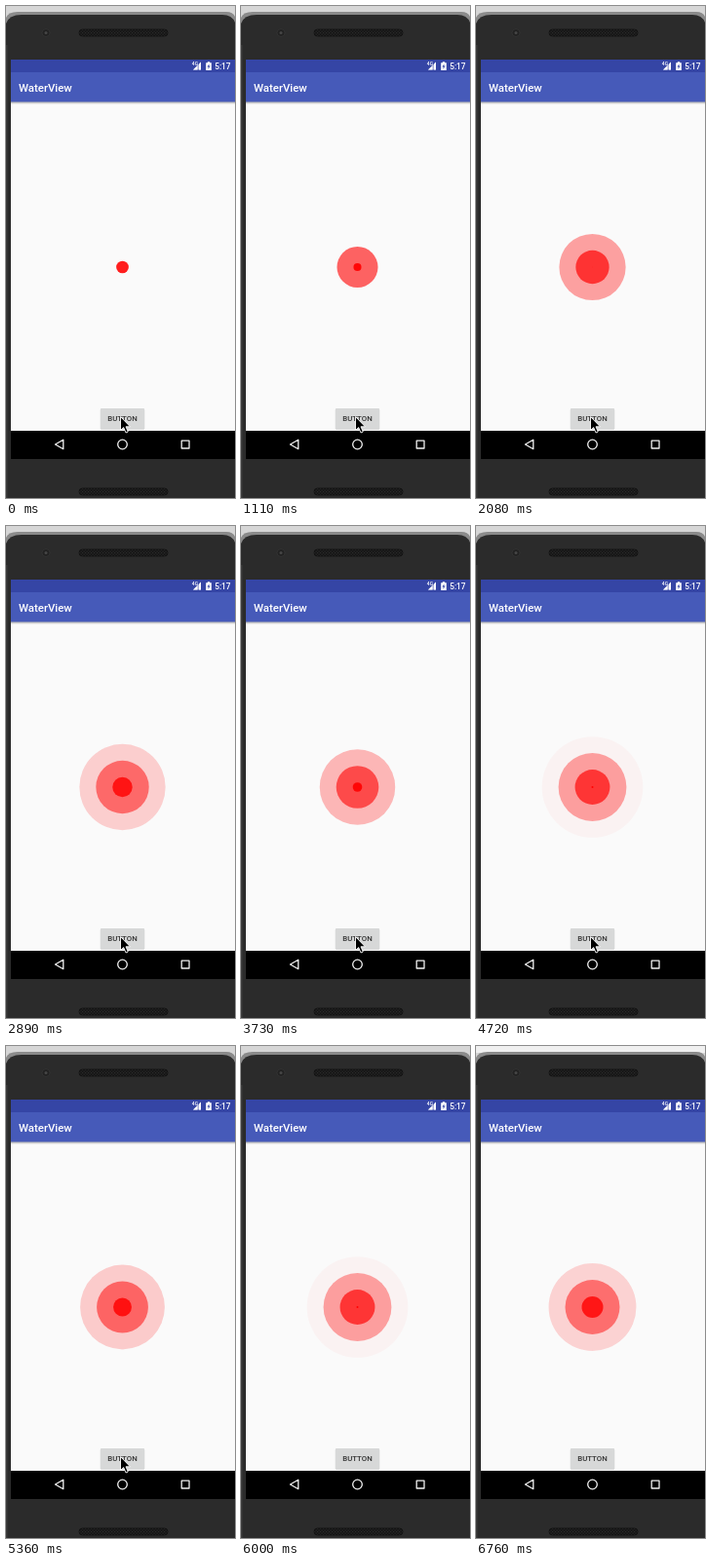
Animation, 235 px wide and 505 px high, one loop 6.86 s. Source, as an HTML page:

```html
<!DOCTYPE html>
<html lang="en">
<head>
<meta charset="utf-8">
<title>WaterView</title>
<style>
  html, body { margin: 0; width: 100%; height: 100%; overflow: hidden; background: #d6d6d6; }
  svg { display: block; width: 235px; height: 505px; }
  text { font-family: Roboto, "Open Sans", sans-serif; font-weight: 500; }
</style>
</head>
<body>
<svg viewBox="0 0 235 505" xmlns="http://www.w3.org/2000/svg">
  <defs>
    <pattern id="mesh" width="3" height="3" patternUnits="userSpaceOnUse">
      <rect width="3" height="3" fill="#141414"/>
      <rect width="1.2" height="1.2" fill="#2c2c2c"/>
      <rect x="1.5" y="1.5" width="1.2" height="1.2" fill="#2c2c2c"/>
    </pattern>
    <linearGradient id="shade" x2="0" y2="1">
      <stop stop-color="#000" stop-opacity=".3"/>
      <stop offset="1" stop-color="#000" stop-opacity="0"/>
    </linearGradient>
  </defs>

  <!-- phone body -->
  <rect id="strip" width="235" height="7" fill="#d6d6d6"/>
  <path d="M0 505V12Q2 6 12 6H226Q233 6 235 11V505Z" fill="#8a8a8a"/>
  <path d="M0 505V18Q3 9 16 9H222Q232 9 235 17V505Z" fill="#2b2b2b"/>
  <rect y="40" width="1.5" height="465" fill="#3a3a3a"/>
  <g fill="url(#mesh)" stroke="#111" stroke-width=".8">
    <rect x="75" y="24" width="91" height="7" rx="3.5"/>
    <rect x="75" y="495" width="91" height="7" rx="3.5"/>
  </g>
  <circle cx="41" cy="27.5" r="4" fill="#222" stroke="#383838" stroke-width=".7"/>
  <circle cx="41" cy="27.5" r="1.5" fill="#464646"/>

  <!-- screen -->
  <rect x="5" y="55" width="230" height="410" fill="#fafafa"/>
  <rect x="5" y="55" width="230" height="13" fill="#3545a5"/>
  <rect x="5" y="68" width="230" height="30.5" fill="#465ab9"/>
  <rect x="5" y="98.5" width="230" height="2.5" fill="url(#shade)"/>
  <text x="13" y="87.8" font-size="11.4" fill="#fff">WaterView</text>

  <!-- status icons -->
  <g fill="#fff">
    <path d="M200 57.5V65.5H192Z" fill-opacity=".55"/>
    <path d="M196.5 61V65.5H192Z"/>
    <path d="M198 59.5L200 57.5V65.5H198Z"/>
    <text x="190.8" y="61.2" font-size="5">4G</text>
    <path d="M206.8 57.2H209.2V58.2H210.8V66H205.2V58.2H206.8Z"/>
    <path d="M208.6 59.2L206.4 62.4H207.8L207.4 64.9L209.6 61.6H208.2Z" fill="#3545a5"/>
    <text x="214.2" y="64.6" font-size="8.3">5:17</text>
  </g>

  <g id="waves" fill="#f00"></g>

  <!-- button -->
  <rect x="96.7" y="413.3" width="45.6" height="21.7" rx="1.5" fill="#000" fill-opacity=".14"/>
  <rect x="97" y="413" width="45" height="21" rx="1" fill="#d7d8d8"/>
  <text x="119.5" y="426.2" font-size="7.8" text-anchor="middle" fill="#333">BUTTON</text>

  <!-- navigation bar -->
  <rect x="5" y="436" width="230" height="29" fill="#000"/>
  <g fill="none" stroke="#f2f2f2" stroke-width="1.3" stroke-linejoin="round">
    <path d="M50.5 450L58.8 445.3V454.7Z"/>
    <circle cx="119.5" cy="450" r="4.8"/>
    <rect x="180.2" y="446.2" width="7.8" height="7.8"/>
  </g>

  <path id="cursor" d="M117.5 421.5V435.5L120.7 432.6L123 438L125.3 437L123 431.8H127.4Z"
        fill="#000" stroke="#fff" stroke-width=".9"/>
</svg>
<script>
  const LOOP = 6860, STEP = 58.2, LAST = 116;
  const FIRST = -480, PERIOD = 1280, SPEED = 0.01325, MAX = 53.5;
  const LEAVE = 5600, LEAVE_MS = 310, BLUR = 6600;

  const byId = id => document.getElementById(id);
  const strip = byId('strip'), cursor = byId('cursor');

  const waves = Array.from({ length: 6 }, (_, i) => {
    const el = document.createElementNS('http://www.w3.org/2000/svg', 'circle');
    el.setAttribute('cx', 119.5);
    el.setAttribute('cy', 268);
    byId('waves').append(el);
    return { el, born: FIRST + i * PERIOD };
  });

  function draw(time) {
    const t = STEP * Math.min(LAST, Math.floor((time + 18) / STEP));

    for (const { el, born } of waves) {
      const r = (t - born) * SPEED;
      const alive = r > 0 && r < MAX;
      el.setAttribute('r', alive ? r : 0);
      el.setAttribute('fill-opacity', alive ? 1 - r / MAX : 0);
    }

    const p = Math.min(1, Math.max(0, (t - LEAVE) / LEAVE_MS));
    cursor.setAttribute('transform', `translate(${58 * p ** 1.7} ${90 * p ** 1.7})`);
    cursor.setAttribute('visibility', p < 1 ? 'visible' : 'hidden');
    strip.setAttribute('fill', t < BLUR ? '#d6d6d6' : '#f0f0f0');
  }

  const start = performance.now();
  function tick() {
    draw((performance.now() - start) % LOOP);
    requestAnimationFrame(tick);
  }
  tick();
</script>
</body>
</html>
```
